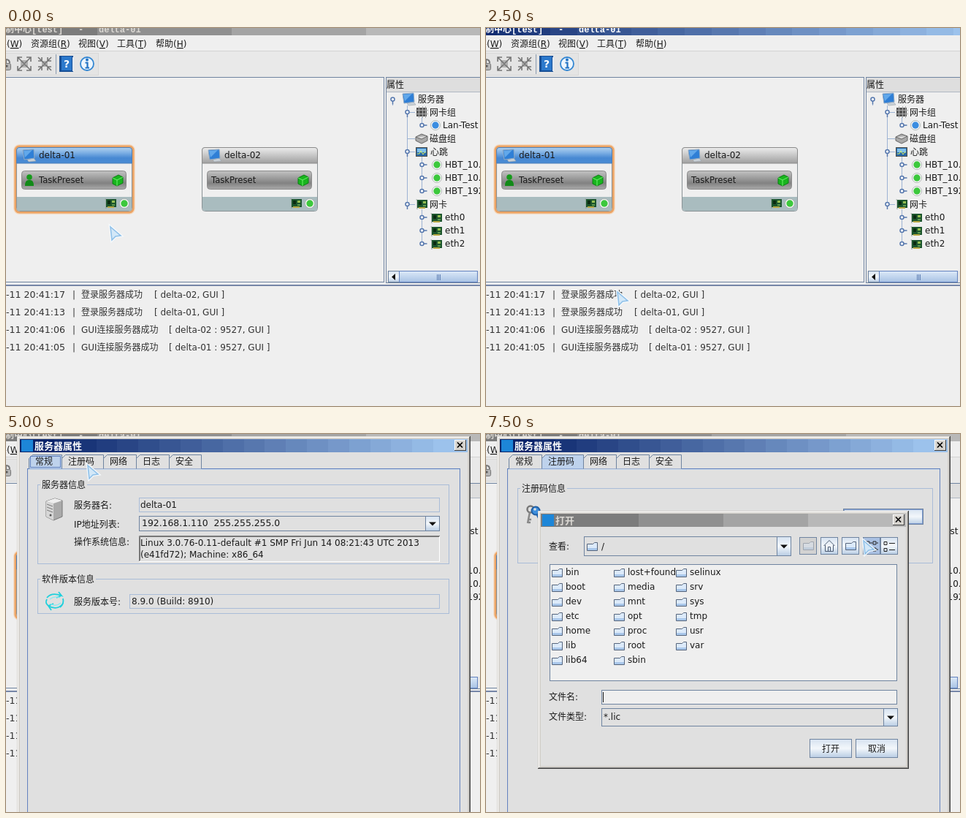
Recreate the animation shown at these times as an HTML page. Size 649 by 517 pixels, loop 8 s.

```html
<!DOCTYPE html>
<html lang="zh-CN">
<head>
<meta charset="utf-8">
<style>
html, body { margin: 0; width: 649px; height: 517px; overflow: hidden; background: #efefef }
svg { display: block }
text { font-family: "DejaVu Sans", "Noto Sans CJK SC", "Noto Sans CJK", sans-serif; white-space: pre }
.mono { font-family: "Liberation Mono", "Noto Sans CJK SC", monospace; font-weight: bold }
.bold { font-weight: bold }
rect { shape-rendering: crispEdges }
.soft { shape-rendering: auto }
</style>
</head>
<body>
<svg id="stage" width="649" height="517" viewBox="0 0 649 517"></svg>
<script>
const LINE = '#7a8fb8', PALE = '#a9bcd8', FACE = '#e0e0e0', PAPER = '#efefef';

// drawing helpers; stroked boxes sit on whole pixels
const text = (x, y, s, fill = '#1a1a1a', size = 12, cls = '') =>
  `<text x="${x}" y="${y}" fill="${fill}" font-size="${size}" class="${cls}">${
    s.replace(/&(.)/g, '<tspan text-decoration="underline">$1</tspan>')}</text>`;
const box = (x, y, w, h, fill) => `<rect x="${x}" y="${y}" width="${w}" height="${h}" fill="${fill}"/>`;
const frame = (x, y, r, b, fill = 'none', stroke = LINE, rx = 0) =>
  `<rect class="${rx ? 'soft' : ''}" x="${x + .5}" y="${y + .5}" width="${r - x}" height="${b - y}" rx="${rx}" fill="${fill}" stroke="${stroke}"/>`;
const path = (d, fill = 'none', stroke = 'none', w = 1) =>
  `<path d="${d}" fill="${fill}" stroke="${stroke}" stroke-width="${w}"/>`;
const dot = (x, y, r, fill, stroke = 'none', w = 1) =>
  `<circle cx="${x}" cy="${y}" r="${r}" fill="${fill}" stroke="${stroke}" stroke-width="${w}"/>`;
const at = (x, y, s) => `<g transform="translate(${x} ${y})">${s}</g>`;
const layer = (id, s) => `<g id="${id}">${s}</g>`;
const grad = (id, ...stops) => `<linearGradient id="${id}" x2="0" y2="1">${
  stops.map((c, i) => `<stop offset="${i / (stops.length - 1)}" stop-color="${c}"/>`).join('')}</linearGradient>`;

// stepped title bar; the first and last band also cover the icon and close button
const bands = (x, y, w, h, from, to, n) => Array.from({length: n}, (_, i) => {
  const edge = k => k == 0 ? x : k == n ? x + w : Math.round(x + 18 + (w - 36) * k / n);
  return `<rect x="${edge(i)}" y="${y}" width="${edge(i + 1) - edge(i)}" height="${h}" style="fill:color-mix(in srgb,${to} ${i / (n - 1) * 100}%,${from})"/>`;
}).join('');
const greyBar = (x, y, w, h) => bands(x, y, w, h, '#7c7c7c', '#b8b8b8', 4);
const blueBar = (x, y, w, h) => bands(x, y, w, h, '#0a246a', '#9cc2ec', 20);

// icons
const monitor = (x, y) => at(x, y, path('M6 14L15 12L18 16L8 17Z', '#c9d0d6', '#909aa2', .5) +
  path('M0 1L15 0L16 12L2 14Z', '#2f7fd6', '#8fa9c4') + path('M1 2L13 1L3 11Z', '#62a8ea'));
const nic = (x, y) => at(x, y, path('M.5 1H2V14', 'none', '#8f9a8f') + box(2, 1, 14, 11, '#1c552c') +
  box(4, 3, 4, 5, '#0a2b12') + box(10, 3, 4, 3, '#92bd50') + box(10, 8, 4, 2, '#5d9a50') + box(4, 11, 9, 2, '#b8a843'));
const light = (x, y, fill = '#3cc83c') => dot(x, y, 6.5, '#f7f7f7', '#a0aaa6', .8) + dot(x, y, 4.7, fill);
const cube = (x, y) => at(x, y, path('M1 5L9 1L15 4L15 12L7 16L1 13Z', '#18b51e', '#0b7d12') +
  path('M1 5L7 8L15 4M7 8V16', 'none', '#6cf06c'));
const person = (x, y) => at(x, y, dot(5, 4, 3.8, '#169a1b') + path('M-1 16Q-1 7 5 8Q11 7 11 16Z', '#128a18'));
const folder = (x, y) => at(x, y, path('M1.5 12.5V3.5H9.5L11.5 1.5H15.5V12.5Z', '#dceafa', '#56657c') +
  path('M2 9H15V12H2Z', '#a9c7ea'));
const logo = (x, y) => box(x, y, 16, 16, '#1d86d8');
const close = (x, y) => box(x, y, 16, 15, '#404040') + box(x, y, 15, 14, '#fff') + box(x + 1, y + 1, 14, 13, '#d6d3ce') +
  path(`M${x + 4} ${y + 3.5}l7 7m0-7l-7 7`, 'none', '#000', 1.7);
const down = (x, y) => path(`M${x - 5} ${y - 2}h10l-5 5Z`, '#111');
const handle = (x, y, open) => path(open ? `M${x} ${y}v7` : `M${x} ${y}h7`, 'none', '#5577ad', 1.5) +
  dot(x, y, 2.5, '#fff', '#5577ad', 1.5);

const button = (x, y, r, b, fill = 'url(#metal)') => frame(x, y, r, b, fill, '#6f84a0');
const field = (x, y, r, b) => frame(x, y, r, b, 'none', PALE);
const combo = (x, y, r, b, arrow) => frame(x, y, r, b, FACE, '#6f84a0') +
  button(arrow, y, r, b) + down((arrow + r) / 2 + .5, (y + b) / 2 + .5);
const group = (x, y, r, b, title, w) => frame(x, y, r, b, 'none', PALE) +
  box(x + 4, y - 2, w + 4, 5, FACE) + text(x + 6, y + 5, title);
const windowBox = (x, y, r, b) => box(x, y, r - x, b - y, '#404040') + box(x, y, r - x - 1, b - y - 1, '#d6d3ce') +
  box(x + 1, y + 1, r - x - 2, b - y - 2, '#808080') + box(x + 1, y + 1, r - x - 3, b - y - 3, '#fff') +
  box(x + 2, y + 2, r - x - 4, b - y - 4, '#d6d3ce') + box(x + 4, y + 4, r - x - 8, b - y - 8, FACE);

// main window
const NODES = ['delta-01', 'delta-02'], TASK = 'TaskPreset';
const glow = (color, w) => `<rect x="-1" y="-1" width="161" height="90" rx="5" class="soft" fill="none" stroke="${color}" stroke-width="${w}"/>`;

function card(x, name, selected) {
  return at(x, 163,
    (selected ? glow('#f6d6b8', 5.5) + glow('#eba364', 3) : '') +
    frame(0, 0, 158, 87, PAPER, '#8a9296', 4) +
    path('M.5 22V4Q.5 .5 4 .5H155Q158.5 .5 158.5 4V22Z', selected ? 'url(#blueHead)' : 'url(#greyHead)', selected ? '#4c7fb8' : '#8b8b8b') +
    path('M1 68H158V84Q158 87 155 87H4Q1 87 1 84Z', '#a9bcbf') +
    monitor(9, 3) + text(31, 15, name) +
    frame(7, 32, 150, 57, 'url(#steel)', '#8b8b8b', 4) +
    (selected ? person(13, 37) : '') + text(selected ? 31 : 13, 49, TASK, '#1a1a1a', 11.6) +
    cube(131, 37) + nic(121, 70) + light(148, 77));
}

function tree() {
  const rows = [[564, 102, '服务器'], [580, 120, '网卡组'], [598, 137, 'Lan-Test'], [580, 156, '磁盘组'],
    [581, 174, '心跳'], [601, 191, 'HBT_10.'], [601, 209, 'HBT_10.'], [601, 227, 'HBT_192.'],
    [580, 246, '网卡'], [601, 263, 'eth0'], [601, 281, 'eth1'], [601, 299, 'eth2']];
  let s = path('M529.5 100V106M549.5 106V241M549.5 115.5H560M549.5 151.5H560M549.5 169.5H560M549.5 241.5H560M569.5 122V133M569.5 176V223M569.5 248V295', 'none', '#9db3d3');
  s += handle(529.5, 97.5, true) + [115, 169, 241].map(y => handle(549.5, y, true)).join('') +
    [133, 187, 205, 223, 259, 277, 295].map(y => handle(569.5, y)).join('');
  s += monitor(543, 89) + light(588, 133, '#3a8de0') + [187, 205, 223].map(y => light(590, y)).join('') +
    nic(561, 234) + [253, 271, 289].map(y => nic(581, y)).join('');
  s += box(562, 109, 14, 12, '#555') + path('M561 112.5H578M561 117.5H578M565.5 107V123M570.5 107V123M574.5 107V123', 'none', '#aaa');
  s += path('M561 149L569 145L577 148V154L569 158L561 154Z', '#aaa', '#666') + path('M561 149L569 152L577 148', '#ddd', '#666');
  s += frame(561, 163, 576, 175, '#2867a8', '#53534a') + box(563, 165, 12, 5, '#7fc0ea') + path('M563 172h3l2-4 3 5 2-3h2', 'none', '#d7f06a');
  return s + rows.map(r => text(...r)).join('');
}

const toolbar = box(0, 32, 649, 35, '#e9e9e9') + frame(-2, 34, 126, 64, '#e4e4e4', '#d8d8d8') +
  path('M0 48V43Q5 43 5 48', 'none', '#777', 2) + frame(-5, 48, 6, 57, '#b5b5b5', '#777', 2) + dot(1, 52, 1.5, '#555') +
  at(25, 49, box(-5, -5, 10, 10, '#b0b0b0') + path('M-9 -9L9 9M9 -9L-9 9M-9 -3V-9H-3M3 -9H9V-3M9 3V9H3M-3 9H-9V3', 'none', '#747474', 1.6)) +
  at(53, 49, box(-4, -4, 8, 8, '#b0b0b0') + path('M-9 -9L9 9M9 -9L-9 9M-9 -4H-4V-9M4 -9V-4H9M9 4H4V9M-4 9V4H-9', 'none', '#747474', 1.6)) +
  box(68, 36, 1, 27, '#8a9ab0') + box(73, 38, 19, 22, '#174f96') + box(76, 39, 14, 19, '#2c79cc') + box(91, 40, 2, 19, '#dfe8f2') +
  text(79, 54, '?', '#fff', 14, 'bold') + dot(111, 49, 9, '#eef6fd', '#3487d2', 1.8) +
  dot(111, 43.5, 2, '#2273c4') + path('M108.5 47.5H111.5V54M108.5 54.5H114', 'none', '#2273c4', 2.2);

const logRows = [['17', '登录服务器成功', 203, `${NODES[1]}, GUI`], ['13', '登录服务器成功', 203, `${NODES[0]}, GUI`],
  ['06', 'GUI连接服务器成功', 223, `${NODES[1]} : 9527, GUI`], ['05', 'GUI连接服务器成功', 223, `${NODES[0]} : 9527, GUI`]];

const caption = fill => text(-1, 6, '制中心[test]', fill, 12, 'mono') + text(99, 6, '-', fill, 12, 'mono') +
  text(127, 6, NODES[0], fill, 12, 'mono');

const main = box(0, 0, 649, 517, PAPER) +
  layer('mainGrey', greyBar(-77, 0, 772, 10) + caption('#dcd9d4')) +
  layer('mainBlue', blueBar(-77, 0, 772, 10) + caption('#fff')) +
  box(0, 10, 649, 22, PAPER) + box(0, 31, 649, 1, '#d2d2d2') +
  [[-11, '导(&W)'], [34, '资源组(&R)'], [99, '视图(&V)'], [152, '工具(&T)'], [205, '帮助(&H)']].map(([x, s]) => text(x, 26, s)).join('') +
  toolbar + frame(-2, 67, 517, 347, PAPER, '#6f84a0') +
  frame(520, 67, 652, 348, PAPER, '#6f84a0') + box(521, 68, 128, 19, '#dedede') + box(521, 87, 128, 1, '#b0b8c4') + text(521, 82, '属性') +
  card(14, NODES[0], true) + card(268, NODES[1], false) + tree() +
  box(521, 332, 128, 16, '#e6e6e6') + button(523, 332, 538, 347) + path('M533 336V345L528 340.5Z', '#111') +
  frame(538, 332, 645, 347, 'url(#thumb)', '#6382bf') + path('M590.5 337V345M592.5 337V345M594.5 337V345', 'none', '#5f7fb4') +
  box(0, 351, 649, 2, '#7686a8') +
  logRows.map(([sec, msg, x, who], i) => {
    const y = 369 + 24 * i;
    return text(0, y, `-11 20:41:${sec}`, '#333', 12.6) + text(91, y, '|', '#333') + text(103, y, msg, '#333') + text(x, y, `[ ${who} ]`, '#333');
  }).join('');

// context menu
const menuItems = [[185, '刷新(&R)'], [210, '登录(&L). . .', 1], [231, '注销(&O)'], [256, '修改密码(&M). . .'], [277, '查看日志(&S)...'],
  [298, '通信(&C). . .'], [324, '创建心跳(&H). . .', 1], [344, '退出群集(&Q)', 1], [369, '属性(&P). . .']];
const menu = frame(135, 168, 259, 377, FACE, '#6f86ad') + [193, 239, 306, 352].map(y => box(136, y, 123, 1, '#6382bf')).join('') +
  menuItems.map(([y, s, off]) => text(141, y, s, off ? '#9a9a9a' : '#1a1a1a')).join('');

const wait = windowBox(147, 253, 505, 310) + greyBar(151, 257, 350, 18) + logo(153, 258) + close(483, 259) +
  text(247, 296, '操作正在执行中，请等待......', '#00f');

// properties dialog
const tabs = [[32, 76, '常规'], [77, 133, '注册码'], [134, 178, '网络'], [179, 223, '日志'], [224, 267, '安全']];
const tab = ([x, r, s], on) => path(`M${x - .5} 47.5V33.5L${x + 4.5} 28.5H${r + .5}V47.5`, on ? '#bed2ec' : FACE, '#6f84a0') + text(x + 8, 42, s);
const tabFocus = (x, r) => frame(x + 1, 30, r - 2, 45, 'none', '#6382bf');

const props = windowBox(15, 3, 636, 530) +
  layer('propsGrey', greyBar(19, 7, 613, 18) + logo(21, 8) + text(39, 21, '服务器属性', '#dcd9d4', 13, 'bold')) +
  layer('propsBlue', blueBar(19, 7, 613, 18) + logo(21, 8) + text(39, 21, '服务器属性', '#fff', 13, 'bold')) +
  close(614, 8) + frame(29, 47, 621, 530, FACE, '#6382bf') + box(30, 48, 591, 1, '#c8d8ea');

const server = at(54, 87, path('M1 5L13 1L23 4L23 26L11 31L1 26Z', '#aaa', '#777') + path('M1 5L11 8V31L1 26Z', '#d6d6d6') +
  path('M1 5L13 1L23 4L11 8Z', '#eee') + path('M2 9L10 12M2 13L10 16M2 17L10 20', 'none', '#777') + dot(7, 24, 1.5, '#555'));
const recycle = at(54, 214, path('M2 10Q8 2 22 7L18 2M22 7L15 10M24 11Q26 18 20 23M24 18Q16 28 4 21L8 27M4 21L11 18M2 12Q-1 17 4 21', 'none', '#1fd0dc', 1.8) +
  path('M6 12Q12 7 20 10M6 18Q14 23 21 17', 'none', '#8aeaf0', 1.3));

const general = tabs.map((t, i) => tab(t, i == 0)).join('') + tabFocus(32, 76) +
  group(43, 69, 606, 177, '服务器信息', 60) + server +
  text(93, 102, '服务器名:') + text(93, 128, 'IP地址列表:') + text(93, 152, '操作系统信息:') +
  field(182, 87, 593, 106) + text(184, 101, NODES[0]) +
  combo(182, 112, 593, 132, 574) + text(186, 126, '192.168.1.110  255.255.255.0', '#1a1a1a', 12.4) +
  frame(182, 139, 593, 174, FACE, '#fff') + path('M182.5 174V139.5H594M183.5 173V140.5H593', 'none', '#777') +
  text(184, 153, 'Linux 3.0.76-0.11-default #1 SMP Fri Jun 14 08:21:43 UTC 2013') + text(184, 169, '(e41fd72); Machine: x86_64') +
  group(43, 198, 606, 245, '软件版本信息', 72) + recycle + text(93, 234, '服务版本号:') +
  field(169, 219, 593, 238) + text(172, 233, '8.9.0 (Build: 8910)');

const keys = at(54, 97, dot(7, 6, 4.5, 'none', '#777', 2.5) + path('M6 10L3 25M4 20H8M4 24H7', 'none', '#888', 2.5) +
  dot(14, 8, 5.5, '#3e8fdd', '#1f5fa5', 2) + dot(13, 6, 1.8, FACE) + path('M16 13L24 30M20 21L24 19M22 27L26 25', 'none', '#2468b4', 3));
const openLabel = text(506, 118, '打开文件(&F)...');
const license = tabs.map((t, i) => tab(t, i == 1)).join('') + layer('tabRing', tabFocus(77, 133)) +
  group(43, 74, 611, 176, '注册码信息', 60) + keys + text(93, 119, '主机ID号:') + text(93, 148, '有效期(&D):') +
  field(163, 105, 478, 124) + text(165, 119, '01030449EB32132A0100', '#1a1a1a', 11) +
  field(163, 134, 478, 153) + text(165, 148, '01032015', '#1a1a1a', 11) +
  layer('openIdle', button(489, 102, 598, 123) + openLabel) +
  layer('openDown', button(489, 102, 598, 123, '#afc2de') + frame(503, 105, 581, 120, 'none', '#8ea8cf') + openLabel) +
  layer('openFocus', button(489, 102, 598, 123) + frame(490, 103, 597, 122, 'none', '#7d9bd0'));

// file chooser
const dirs = 'bin boot dev etc home lib lib64 lost+found media mnt opt proc root sbin selinux srv sys tmp usr var'.split(' ');
const gridGlyph = path('M521 147h4v4h-4zM530 147h4v4h-4zM521 156h4v4h-4zM530 156h4v4h-4zM526 149h3M526 158h3M535 149h2M535 158h2', 'none', '#222');
const chooser = windowBox(71, 105, 579, 458) + greyBar(75, 109, 500, 18) + logo(77, 110) +
  text(95, 123, '打开', '#dcd9d4', 13, 'bold') + close(557, 110) +
  text(86, 158, '查看:') + combo(134, 140, 417, 166, 398) + folder(137, 147) + text(158, 158, '/') +
  button(429, 141, 452, 164, '#d2d2d2') + `<g opacity=".4">${folder(433, 146)}</g>` +
  button(458, 141, 481, 164) + path('M462.5 153L470 145.5L477.5 153M464.5 152V160.5H475.5V152M468.5 160V154.5H471.5V160', 'none', '#4c5b72') +
  button(487, 141, 510, 164) + folder(491, 146) +
  button(516, 141, 539, 164, '#a9c0e2') + gridGlyph + button(540, 141, 563, 164) +
  path('M545 147.5h4v4h-4zM545 156.5h4v4h-4zM552 149.5h8M552 158.5h8', 'none', '#222') +
  frame(87, 178, 562, 337, PAPER, '#6f84a0') +
  dirs.map((d, i) => {
    const x = 89 + 85 * Math.floor(i / 7), y = 193 + 20 * (i % 7);
    return folder(x, y - 10) + text(x + 20, y, d);
  }).join('') +
  text(86, 364, '文件名:') + frame(158, 350, 562, 369, PAPER, '#6f84a0') + box(160, 353, 1, 14, '#111') +
  text(86, 391, '文件类型:') + combo(158, 375, 563, 399, 544) + text(161, 391, '*.lic') +
  button(443, 417, 500, 442) + text(460, 435, '打开') + button(506, 417, 563, 442) + text(523, 435, '取消');

const arrow = 'M2 2L16 14L9 15L4 20Z';
const pointer = path(arrow, '#fff', '#f6fafd', 4) + path(arrow, '#d3e8f8', '#8fc0e8', 1.6);

const $ = id => document.getElementById(id);
$('stage').innerHTML = '<defs>' + grad('blueHead', '#b0d0ee', '#7db0e4', '#4788d2', '#4a8cd4') + grad('greyHead', '#ececec', '#c6c6c6', '#a0a0a0') +
  grad('steel', '#c2c2c2', '#a2a2a2', '#828282', '#aaa') + grad('metal', '#d6e2f0', '#f3f7fb', '#b9cde4') + grad('thumb', '#dce9f8', '#c2d6ee', '#a9c3e4') +
  '</defs>' + main + layer('menu', menu) + layer('wait', wait) +
  layer('props', props + layer('general', general) + layer('license', license)) + layer('chooser', chooser) + layer('pointer', pointer);

// each layer shows from one half-second step up to another
const spans = {
  mainGrey: [[0, 3], [10, 16]], mainBlue: [[3, 10]], menu: [[3, 5]], wait: [[6, 8]], props: [[8, 16]],
  propsGrey: [[8, 10]], propsBlue: [[10, 16]], general: [[8, 11]], license: [[11, 16]], tabRing: [[11, 14]],
  openIdle: [[11, 14]], openDown: [[14, 15]], openFocus: [[15, 16]], chooser: [[15, 16]]
};
const pointerPath = [[141, 270], [147, 179], [139, 166], [147, 192], [178, 349], [178, 359], [165, 328], [247, 264],
  [247, 249], [130, 72], [110, 41], [110, 41], [134, 73], [518, 130], [525, 115], [515, 144]];

let shown = -1;
function draw(now) {
  const step = Math.floor(now % 8000 / 500);
  if (step != shown) {
    shown = step;
    for (const id in spans) $(id).style.display = spans[id].some(([a, b]) => step >= a && step < b) ? '' : 'none';
    $('pointer').setAttribute('transform', `translate(${pointerPath[step]})`);
  }
  requestAnimationFrame(draw);
}
draw(performance.now());
</script>
</body>
</html>
```
